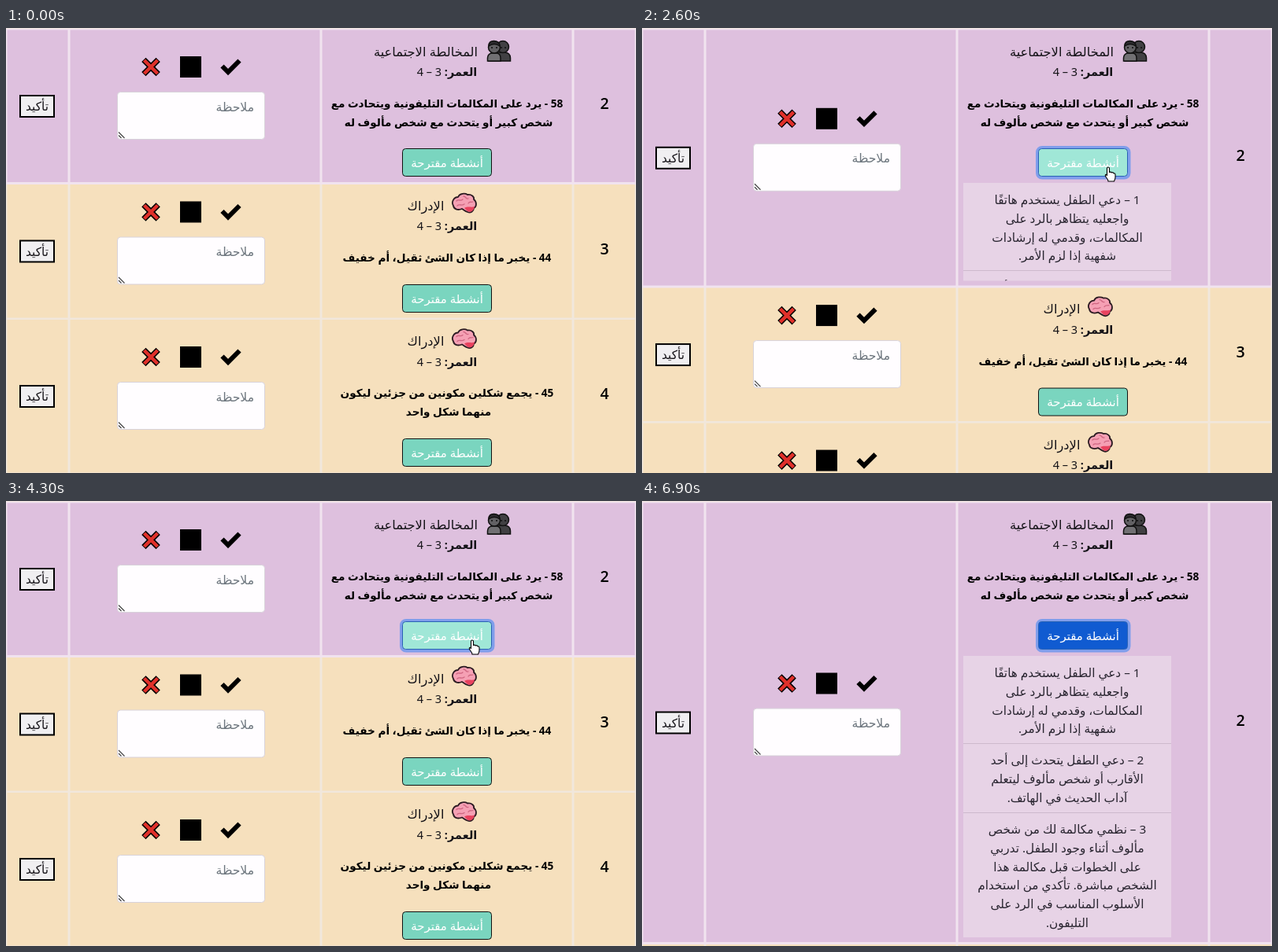
These frames come from a looping animation (800x566 px, 7000 ms). An HTML page:

```html
<!DOCTYPE html>
<html lang="ar">
<head>
<meta charset="utf-8">
<style>
  html, body { margin: 0; width: 100%; height: 100%; overflow: hidden; background: #f6e9d5; }
  svg { display: block; width: 800px; height: 566px; }
  text { font-family: "Noto Sans", "DejaVu Sans", sans-serif; font-size: 15.3px; direction: rtl; text-anchor: middle; fill: #151318; }
  .title { font-size: 16.3px; }
  .age { font-size: 14.5px; }
  .task { font-size: 13.6px; font-weight: 700; fill: #000; }
  .bold { font-weight: 700; }
  .number { font-family: "Open Sans", "Noto Sans", sans-serif; font-size: 19.5px; font-weight: 600; fill: #000; }
  .hint { font-size: 15.6px; fill: #6c757d; text-anchor: start; }
  .label { fill: #fff; font-size: 15px; }
  .item { fill: #292530; }
</style>
</head>
<body>
<svg viewBox="0 0 800 566" xmlns="http://www.w3.org/2000/svg">
  <defs>
    <clipPath id="reveal"><rect id="revealBox" x="400" y="190" width="320" height="0"/></clipPath>
    <g id="controls">
      <path d="M-6.500-6.500L6.500 6.500M6.500-6.500L-6.500 6.500" transform="translate(184 -49.5)" stroke="#000" stroke-width="7.500" stroke-linecap="square"/>
      <path d="M-8.500-8.500L8.500 8.500M8.500-8.500L-8.500 8.500" transform="translate(184 -49.5)" stroke="#e0302a" stroke-width="4.500"/>
      <rect x="221" y="-63" width="27" height="27"/>
      <path d="M274.5-50.5L282-43L296.5-57.5" fill="none" stroke="#000" stroke-width="6"/>
      <rect x="141.5" y="-17.5" width="187" height="60" rx="4" fill="#fffdff" stroke="#d8d2da"/>
      <path d="M143 33.5L150.500 41M143 37.500L146.500 41" stroke="#444" stroke-width="1.200"/>
      <text class="hint" x="315" y="6.500">ملاحظة</text>
      <rect x="18" y="-13" width="43" height="27" fill="#f0eff1" stroke="#000" stroke-width="2"/>
      <text x="39.500" y="6" fill="#000">تأكيد</text>
    </g>
    <g id="brain" stroke-linejoin="round" stroke-linecap="round">
      <path d="M-14 3C-17-2-13-8-8-8C-6-13 1-13 4-11C9-12 13-8 12-5C16-2 16 4 12 6C12 10 8 13 4 11C1 10-1 8-3 7C-8 9-13 8-14 3Z" fill="#f5a0b4" stroke="#2c1b22" stroke-width="1.800"/>
      <path d="M0 6C5 3 9 6 13 4C12 10 8 12 4 10Z" fill="#e8435f"/>
      <path d="M-10-3C-7-6-5-2-2-5M-1-9C2-9 2-5 5-6M-9 3C-6 0-4 4 0 1M5 0C7-3 9-1 11-2" fill="none" stroke="#cf6681" stroke-width="1.300"/>
    </g>
    <g id="people" stroke="#111" stroke-width="1.500">
      <path d="M613 42V38Q613 31 620 31H633Q640 31 640.500 38V42Z" fill="#414043"/>
      <circle cx="631" cy="24" r="7.500" fill="#414043"/>
      <path d="M611.500 42V38Q612 32 618 32H622Q628 32 628 38V42Z" fill="#717073"/>
      <circle cx="620" cy="24.500" r="7.500" fill="#626164"/>
      <path d="M613 23Q613 16 620 16.500Q627 17 627 23Q620 18 613 23Z" fill="#2b2a2d"/>
      <path d="M617 25h.1M623 25h.1M629 25h.1M634 25h.1" stroke-linecap="round" stroke-width="2"/>
    </g>
  </defs>
  <g id="lower"></g>
  <g id="upper"></g>
  <g id="list" clip-path="url(#reveal)"></g>
  <g id="pointer" stroke="#000" stroke-width="1.100" stroke-linejoin="round" fill="#fff">
    <path id="hand" d="M-1.500 1.500Q-1.500 0 0 0Q1.500 0 1.500 1.500V6.500Q3.500 5.500 4.300 7Q6.300 6 7 8Q9 7.500 9 9.500V13Q9 15 7.500 18H0Q0 16-2.500 13Q-4.500 10-3 9.300L-1.500 10.500Z"/>
    <path id="arrow" d="M0 0V16L3.700 12.500L6.300 18.300L8.700 17.200L6.200 11.700H11.500Z"/>
  </g>
</svg>
<script>
const LOOP = 7000, STEP = 100, SLIDE = 350, GROWTH = 365;
const PINK = { fill: "#dec0de", line: "#f1e3ef" };
const CREAM = { fill: "#f6e0bd", line: "#f1e7dc" };
const get = id => document.getElementById(id);
const text = (cls, x, y, content) => `<text class="${cls}" x="${x}" y="${y}">${content}</text>`;
const rect = (x, y, w, h, attrs) => `<rect x="${x}" y="${y}" width="${w}" height="${h}" ${attrs}/>`;

const button = (y, cls = "button") => rect(503.5, y, 113, 35, `class="${cls}" rx="4" fill="#7ad5bf" stroke="#111"`)
  + text("label", 560, y + 23, "أنشطة مقترحة");

function background(top, height, { fill, line }) {
  const columns = [0, 80, 400, 720, 800].map(x => `M${x} ${top}v${height}`).join("");
  return rect(0, top, 800, height, `fill="${fill}"`)
    + `<path d="${columns}M0 ${top + height}h800" stroke="${line}" stroke-width="3"/>`;
}

const side = (number, middle) => `<g transform="translate(0 ${middle})"><use href="#controls"/>`
  + text("number", 760, 4, number) + "</g>";

const heading = (title, y) => text("title", 533, y, title)
  + text("age", 560, y + 25.5, '<tspan class="bold">العمر:</tspan> 3 – 4');

const tasks = (lines, y) => lines.map((line, i) => text("task", i ? 562 : 560, y + 24 * i, line)).join("");

get("lower").innerHTML =
  background(198, 172, CREAM) + background(371, 196, CREAM)
  + side(3, 283.5) + heading("الإدراك", 231.5)
  + '<use href="#brain" x="582" y="223"/>'
  + tasks(["44 - يخبر ما إذا كان الشئ ثقيل، أم خفيف"], 297) + button(326.5)
  + side(4, 468) + heading("الإدراك", 404)
  + '<use href="#brain" x="582" y="395.5"/>'
  + tasks(["45 - يجمع شكلين مكونين من جزئين ليكون", "منهما شكل واحد"], 469) + button(522.5);

get("upper").innerHTML = '<g id="card"></g><g id="sideUpper">' + side(2, 0) + "</g>"
  + heading("المخالطة الاجتماعية", 35.5) + '<use href="#people"/>'
  + tasks(["58 - يرد على المكالمات التليفونية ويتحادث مع", "شخص كبير أو يتحدث مع شخص مألوف له"], 100.5)
  + rect(502, 152, 116.5, 38.5, 'id="ring" rx="6" fill="none" stroke="#809eeb" stroke-width="4"')
  + button(153.5, "main");

const items = [
  [224, ["1 – دعي الطفل يستخدم هاتفًا", "واجعليه يتظاهر بالرد على", "المكالمات، وقدمي له إرشادات", "شفهية إذا لزم الأمر."]],
  [335, ["2 – دعي الطفل يتحدث إلى أحد", "الأقارب أو شخص مألوف ليتعلم", "آداب الحديث في الهاتف."]],
  [423, ["3 – نظمي مكالمة لك من شخص", "مألوف أثناء وجود الطفل. تدربي", "على الخطوات قبل مكالمة هذا", "الشخص مباشرة. تأكدي من استخدام", "الأسلوب المناسب في الرد على", "التليفون."]]
];
get("list").innerHTML = rect(408, 197, 264, 358, 'fill="#e7d3e6"')
  + '<path d="M408 308.500h264M408 396.500h264" stroke="#cdb9cd"/>'
  + items.map(([y, lines]) => lines.map((line, i) => text("item", 540, y + i * 23.8, line)).join("")).join("");

const mainButton = document.querySelector(".main");
const clamp = v => Math.min(1, Math.max(0, v));
const smooth = v => v * v * (3 - 2 * v);

// CSS "ease": cubic-bezier(.25, .1, .25, 1)
function ease(x) {
  if (x <= 0 || x >= 1) return clamp(x);
  const curve = (s, a, b) => 3 * (1 - s) ** 2 * s * a + 3 * (1 - s) * s * s * b + s ** 3;
  let low = 0, high = 1;
  for (let i = 0; i < 24; i++) {
    const mid = (low + high) / 2;
    if (curve(mid, .25, .25) < x) low = mid; else high = mid;
  }
  return curve(low, .1, 1);
}

const slide = (t, start) => ease((t - start) / SLIDE);
const openness = t => slide(t, 2520) - slide(t, 3880) + slide(t, 4360);

const route = [[1500, 715, 568], [2200, 592, 177], [5700, 592, 177], [6700, 660, 430], [6900, 690, 570]];
function cursorAt(t) {
  const i = route.findIndex(([time]) => time > t);
  if (i < 1) return null;
  const [t0, x0, y0] = route[i - 1], [t1, x1, y1] = route[i];
  const k = smooth((t - t0) / (t1 - t0));
  return [x0 + (x1 - x0) * k, y0 + (y1 - y0) * k];
}

function draw(t) {
  const growth = GROWTH * openness(t);
  get("card").innerHTML = background(1, 196.5 + growth, PINK)
    + `<path d="M0 1.500h800" stroke="${PINK.line}" stroke-width="2"/>`;
  get("sideUpper").setAttribute("transform", `translate(0 ${99 + growth / 2})`);
  get("lower").setAttribute("transform", `translate(0 ${growth})`);
  get("revealBox").setAttribute("height", growth);

  const cursor = cursorAt(t);
  const hover = cursor && Math.abs(cursor[0] - 560) < 57 && Math.abs(cursor[1] - 171.5) < 18;
  const focused = t >= 2400;
  mainButton.setAttribute("fill", hover ? "#a0e7d7" : focused ? "#105bd1" : "#7ad5bf");
  mainButton.setAttribute("stroke", focused ? "#2862b5" : "#111");
  get("ring").style.display = focused ? "" : "none";

  get("pointer").style.display = cursor ? "" : "none";
  if (cursor) get("pointer").setAttribute("transform", `translate(${cursor})`);
  get("hand").style.display = hover ? "" : "none";
  get("arrow").style.display = hover ? "none" : "";
}

const began = performance.now();
function tick() {
  const t = (performance.now() - began) % LOOP;
  draw(Math.floor(t / STEP) * STEP);
  requestAnimationFrame(tick);
}
tick();
</script>
</body>
</html>
```
